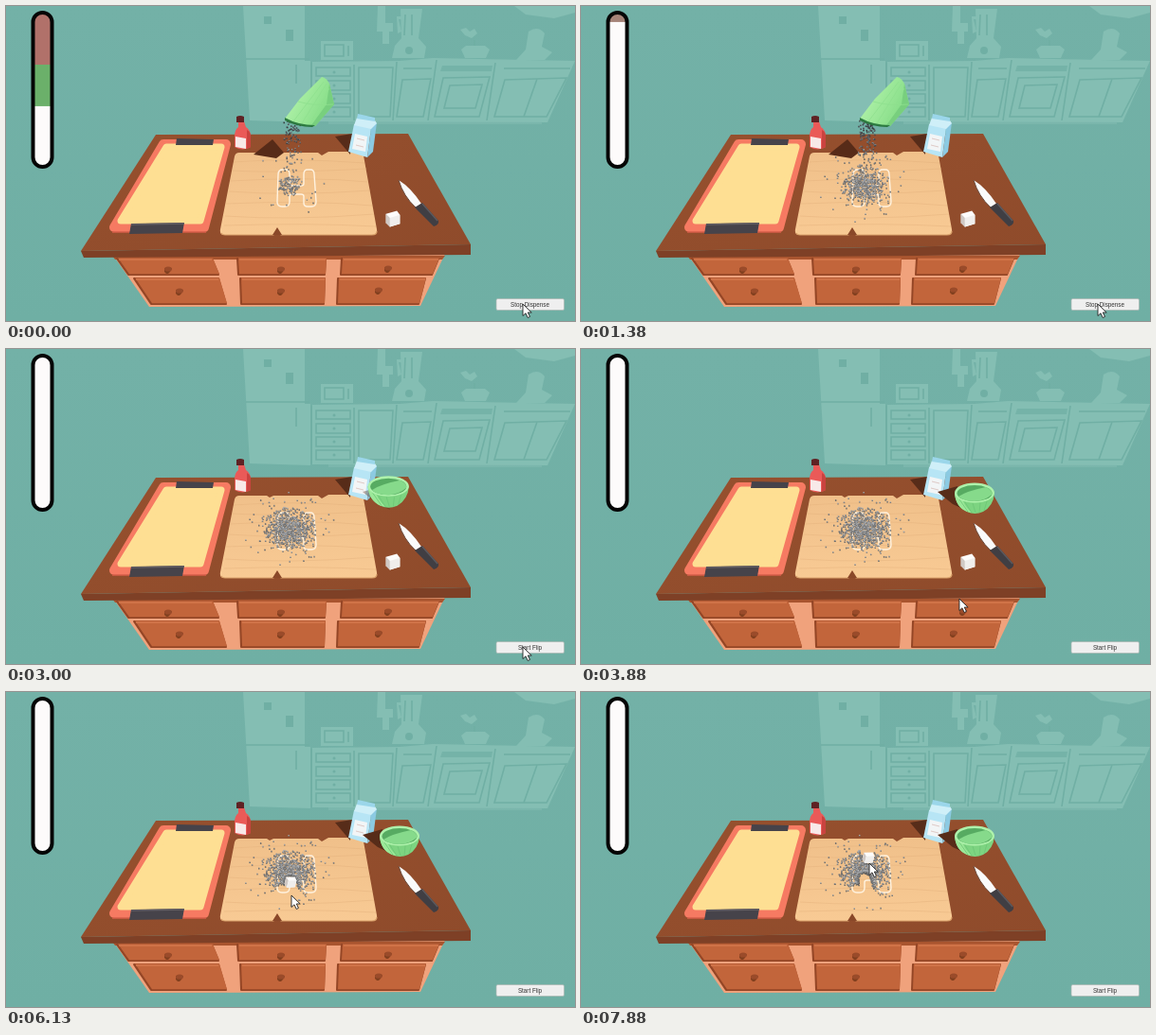
An HTML page with a canvas for the animation above (8000 ms loop, 600 px wide and 333 px high).

```html
<!DOCTYPE html>
<html lang="en">
<head>
<meta charset="utf-8">
<title>Kitchen powder game</title>
<style>
html, body { margin: 0; width: 100%; height: 100%; overflow: hidden; background: #70afa5; }
#stage { position: relative; width: 600px; height: 333px; overflow: hidden; }
svg, canvas { position: absolute; left: 0; top: 0; width: 600px; height: 333px; }
text { font: 6.3px "Liberation Sans", Arial, sans-serif; fill: #333; text-anchor: middle; }
</style>
</head>
<body>
<div id="stage">
<svg viewBox="0 0 600 333">
  <defs>
    <linearGradient id="wall" x2="0" y2="1">
      <stop offset="0" stop-color="#73b1a7"/><stop offset="1" stop-color="#6fafa4"/>
    </linearGradient>
    <linearGradient id="top" x2="1" y2="1">
      <stop offset="0" stop-color="#96502e"/><stop offset="1" stop-color="#8f4b2b"/>
    </linearGradient>
    <linearGradient id="wood" x2="0" y2="1">
      <stop offset="0" stop-color="#f0c08a"/><stop offset="1" stop-color="#f8ca94"/>
    </linearGradient>
    <linearGradient id="shell" x2="1" y2=".5">
      <stop offset=".2" stop-color="#b2f3aa"/><stop offset="1" stop-color="#84dc86"/>
    </linearGradient>
  </defs>
  <rect width="600" height="333" fill="url(#wall)"/>

  <!-- pale kitchen on the wall -->
  <g fill="#84beb3">
    <path d="M250 0H315V58H321V123L257 121Z"/>
    <path d="M323 59L415 58 450 55 600 58 571 123 323 122Z"/>
    <path d="M332 37H366V57H332Z"/>
    <path d="M392 0H400V18H408V27H404V40H397V27H391Z"/>
    <path d="M416 3H439L435 34 443 43 441 55H407L410 42 417 34Z"/>
    <path d="M412 11H418V14H414L417 27 413 29Z"/>
    <path d="M480 46L485 42H505L510 46 506 55H484Z"/>
    <path d="M479 25l6-2 4 4 5-3 3 5-6 5-7-3z"/>
    <path d="M536 0H600V7L578 13 548 9Z"/>
    <path d="M551 27Q561 20 568 29L565 43 576 49 568 57H538L548 46Z"/>
    <path d="M340 122H565V125H340Z" opacity=".5"/>
  </g>
  <g fill="none" stroke="#70afa4" stroke-width="1.6">
    <path d="M253 56H320M306 62V82M322 60V121M367 62V121M412 59L408 121M454 57L445 121M516 60L507 121"/>
    <path d="M327 65h36v9h-36zM327 79h36v10h-36zM327 93h36v10h-36zM327 107h36v10h-36z"/>
    <path d="M372 65H408L405 117H372ZM418 78L448 77 440 117H412Z"/>
    <path d="M461 76L510 75 499 117H452ZM468 84L502 83 495 108H462Z"/>
    <path d="M526 78L591 76 570 117H515ZM560 77L546 117M419 66H449M525 66H595"/>
    <path d="M336 41h20v12h-20zM361 42v11M494 36v6M421 9l-1 22M428 9v22"/>
  </g>
  <g fill="#70afa4">
    <path d="M272 11h8v8h-8zM295 25h8v12h-8z"/>
    <path d="M460 63H513L512 69H458Z" opacity=".7"/>
    <circle cx="425" cy="47" r="4"/><circle cx="346" cy="70" r="1.5"/>
    <circle cx="346" cy="84" r="1.5"/><circle cx="346" cy="98" r="1.5"/><circle cx="346" cy="112" r="1.5"/>
  </g>

  <!-- counter -->
  <path d="M112 262H463L437 317 151 318Z" fill="#f0a27c"/>
  <path d="M112 264H463L460 268H115Z" fill="#a9552f"/>
  <g id="drawers"></g>
  <path d="M158 136L424 135 490 252 79 259Z" fill="url(#top)"/>
  <path d="M79 259L490 252V263L82 266Z" fill="#7e4026"/>

  <!-- tray -->
  <path d="M166 146L232 146 209 234 114 234Z" fill="#f67a62" stroke="#f67a62" stroke-width="10" stroke-linejoin="round"/>
  <path d="M112 239H211" stroke="#d55c49" stroke-width="1.6"/>
  <path d="M169 149L227 149 205 227 121 227Z" fill="#fedf93" stroke="#fedf93" stroke-width="7" stroke-linejoin="round"/>
  <path d="M180 140L219 141 218 147 179 147Z" fill="#46434a"/>
  <path d="M132 230L188 229 186 240 130 241Z" fill="#46434a"/>
  <path d="M132 231L188 230" stroke="#625e64" stroke-width="1.5"/>

  <!-- board -->
  <path d="M246 155H275L278 157 282 155H329L333 158 340 154H372Q376 154 377 158L391 236Q392 242 386 242H290L286 235 282 242H230Q225 242 226 236L241 159Q242 155 246 155Z" fill="url(#wood)"/>
  <path d="M227 240Q228 242 231 242H282L284 239M289 240L290 242H386Q391 242 391 238" fill="none" stroke="#dba36c" stroke-width="1.2"/>
  <path d="M281 242L286 234 291 242Z" fill="#8a4829"/>
  <path d="M240 165Q300 160 378 166M238 174Q290 177 380 172M236 185Q320 180 382 186M235 196Q300 201 384 195M232 209Q320 205 386 211M231 222Q300 227 388 220M230 232Q320 229 390 233" fill="none" stroke="#e3b27c" stroke-width=".8" opacity=".6"/>
  <path d="M292 173H295Q299 173 299 178V188Q299 190 302 190H311Q314 190 314 188V178Q314 173 318 173H321Q325 173 325 178L327 207Q327 212 322 212H318Q314 212 314 208V201Q314 199 311 199H302Q299 199 299 201V207Q299 212 294 212H291Q286 212 286 207L287 178Q287 173 292 173Z" fill="none" stroke="#fff2df" stroke-width="1.4"/>

  <!-- bottle -->
  <path d="M245 122H251L253 128Q258 131 258 138V149Q250 154 241 149V138Q241 131 245 128Z" fill="#ea5a58"/>
  <path d="M243 117Q247 115 251 117V123H243Z" fill="#5f2224"/>
  <path d="M242 138L253 140V151L242 149Z" fill="#f8e9e8"/>
  <path d="M254 131Q258 133 258 138V149L254 151Z" fill="#c9433f"/>

  <!-- carton -->
  <path d="M347 138L365 135 363 157Z" fill="#572c19"/>
  <path d="M367 125L385 129 381 160 361 154Z" fill="#b7e5f5"/>
  <path d="M385 129L391 123 387 154 381 160Z" fill="#8ccae2"/>
  <path d="M370 118L389 121 391 124 385 130 367 126Z" fill="#cfeff8"/>
  <path d="M371 114L389 118V122L370 119Z" fill="#9bd6ea"/>
  <path d="M368 135L381 138 379 154 365 151Z" fill="#f2f5f6"/>
  <path d="M370 140L378 142M369 147L377 149" stroke="#dcc4c0" stroke-width=".9"/>

  <!-- knife -->
  <path d="M414 184Q427 192 438 209L432 213Q419 201 414 184Z" fill="#fafafa"/>
  <path d="M414 184Q419 201 432 213" fill="none" stroke="#6a4a3c" stroke-width="1"/>
  <path d="M431 213L439 208 456 227Q457 231 451 233Z" fill="#403e43"/>
  <path d="M439 209L455 227" stroke="#5d5b60" stroke-width="1.3"/>
  <path id="pourShade" d="M281 141L293 155 285 161 261 157Z" fill="#572b18"/>
</svg>

<canvas id="dots" width="1200" height="666"></canvas>

<svg viewBox="0 0 600 333">
  <path id="restShade" d="M376 151L397 145 405 170 392 164Z" fill="#572c19"/>
  <g id="pour">
    <path d="M333 75Q338 76 341 82L346 104 326 127Q307 127 294 119L310 98Z" fill="url(#shell)"/>
    <path d="M341 82L346 104 326 127 322 126 338 104Z" fill="#78cf7e"/>
    <path d="M335 80L303 122M338 82L312 124M341 87L320 126M308 101Q325 106 345 104" fill="none" stroke="#8fe08e" stroke-width=".8"/>
    <path d="M294 118Q308 126 326 126L323 128Q307 128 294 121Z" fill="#2c7a40"/>
  </g>
  <g id="bowl">
    <path d="M-21 -5Q-20 10 -8 15Q0 19 9 15Q20 9 21 -5Z" fill="#7dd481"/>
    <path d="M-21 -5Q-20 10 -8 15L-3 16Q-12 8 -13 0Z" fill="#9ce899"/>
    <path d="M-16 2L-7 15M-10 5L-3 16M-2 6L1 16M6 6L5 16M13 4L10 14" stroke="#6cc676" stroke-width=".8"/>
    <ellipse cy="-5" rx="21" ry="10.5" fill="#aef2ab"/>
    <ellipse cy="-4.5" rx="18.5" ry="8.5" fill="#57ab62"/>
    <path d="M-17 -1Q-8 -7 12 -11Q20 -7 18 -3Q10 4 0 4Q-11 4 -17 -1Z" fill="#86da8b"/>
  </g>
  <g id="cube">
    <path d="M-7 -5L4 -8 7 -4 7 5 -3 8 -7 4Z" fill="#fdfcfb"/>
    <path d="M-7 -5L-3 -1V8L-7 4Z" fill="#cfc8c4"/>
    <path d="M-3 -1L7 -4V5L-3 8Z" fill="#f0eeec"/>
  </g>

  <clipPath id="tube"><rect x="29.5" y="8" width="17.5" height="161" rx="8.7"/></clipPath>
  <g clip-path="url(#tube)">
    <rect x="29" y="7" width="19" height="55" fill="#b1716a"/>
    <rect x="29" y="62" width="19" height="48" fill="#6bb06a"/>
    <rect id="cap" x="29" y="7" width="19" height="12" fill="#a58378"/>
    <rect id="fill" x="29" y="106" width="19" height="170" fill="#fdfbfb"/>
  </g>
  <rect x="28.5" y="7" width="20" height="163" rx="10" fill="none" stroke="#050505" stroke-width="4"/>

  <rect x="517" y="309.5" width="71.5" height="12" rx="1.5" fill="#efefef" stroke="#a9b6b2" stroke-width=".7"/>
  <text id="label" x="552.5" y="318">Stop Dispense</text>
  <circle id="click" r="3" fill="#df4a35"/>
  <path id="cursor" d="M0 0V12.5L3 9.8 5.2 14.5 7.5 13.4 5.3 9H9.2Z" fill="#fff" stroke="#222" stroke-width=".9"/>
</svg>
</div>

<script>
const LOOP = 8000, COUNT = 900, FALL = 430, LIP = 120;
const $ = id => document.getElementById(id);
const ctx = $("dots").getContext("2d");
const clamp = (v, a = 0, b = 1) => Math.min(b, Math.max(a, v));
const mix = (a, b, p) => a + (b - a) * p;
const between = (t, a, b) => t >= a && t < b;

let seed = 71;
const rand = () => (seed = (seed * 16807) % 2147483647) / 2147483647;

// Keys are [time, x, y]; gentle segments ease in and out.
function along(keys, t, gentle) {
  let i = 1;
  while (i < keys.length - 1 && t > keys[i][0]) i++;
  const [a, b] = [keys[i - 1], keys[i]];
  let p = clamp((t - a[0]) / (b[0] - a[0]));
  if (gentle) p = p * p * (3 - 2 * p);
  return [mix(a[1], b[1], p), mix(a[2], b[2], p)];
}

const cubePath = [[4950, 408, 225], [5300, 294, 222], [5680, 291, 210], [5880, 303, 214],
  [6130, 300, 201], [6350, 299, 198], [6550, 300, 220], [6800, 346, 225],
  [7100, 350, 156], [7350, 303, 152], [7880, 303, 175], [8000, 303, 177]];
const cursorPath = [[3250, 545, 315], [4400, 290, 226], [5000, 290, 226], [5300, 295, 236]];

const grains = Array.from({ length: COUNT }, () => {
  const born = mix(-800, 1720, rand());
  const grow = mix(0.35, 1, clamp((born + 800) / 1700));
  const far = rand() < 0.08;
  const r = far ? mix(0.9, 1.75, rand() ** 1.5) : Math.sqrt(rand()) * grow;
  const angle = rand() * Math.PI * 2;
  return {
    born, x: 299 + Math.cos(angle) * r * 28, y: 190 + Math.sin(angle) * r * 22.5,
    from: mix(293, 311, rand()), tone: rand()
  };
}).sort((a, b) => a.y - b.y);

// Dark at the bowl's lip, paler towards the board.
function drawGrain(x, y, tone, fallen) {
  const g = Math.round(mix(mix(35, 90, tone), mix(110, 185, tone), fallen));
  ctx.fillStyle = fallen < 0.6 ? "#34373a" : "#5a5753";
  ctx.fillRect(x - 0.7, y - 0.2, 1.5, 1.1);
  ctx.fillStyle = `rgb(${g},${g + 3},${g + 7})`;
  ctx.fillRect(x - 0.7, y - 0.8, 1.3, 1.2);
}

// Grains touched by the cube slide out to its rim.
function pushed(grain, trail) {
  let { x, y } = grain;
  for (const [cx, cy] of trail) {
    const dx = x - cx, dy = y - cy, d = Math.hypot(dx, dy) || 1;
    const reach = 6 + grain.tone * 3.5;
    if (d < reach) {
      x = cx + dx / d * reach;
      y = cy + dy / d * reach;
    }
  }
  return [x, y];
}

function drawGrains(t) {
  ctx.setTransform(2, 0, 0, 2, 0, 0);
  ctx.clearRect(0, 0, 600, 333);
  const start = cubePath[1][0], trail = [];
  for (let s = start; s <= t; s += 25) trail.push(along(cubePath, s));
  if (t > start) trail.push(along(cubePath, t));
  for (const g of grains) {
    const p = (t - g.born) / FALL;
    if (p < 0) continue;
    if (p < 1) drawGrain(mix(g.from, g.x, p ** 3), mix(LIP, g.y, p ** 1.6), g.tone, p);
    else drawGrain(...pushed(g, trail), g.tone, 1);
  }
}

function drawBowl(t) {
  const p = clamp((t - 2300) / 800), x = mix(320, 415, p), y = mix(102, 157, p);
  const tipped = p < 0.5;
  $("pour").style.display = $("pourShade").style.display = tipped ? "" : "none";
  $("bowl").style.display = tipped ? "none" : "";
  $("pour").setAttribute("transform", `translate(${x - 320} ${y - 102}) rotate(${p * 130} 320 102)`);
  const tilt = Math.min(0, mix(-130, 22, p));
  $("bowl").setAttribute("transform", `translate(${x} ${y}) rotate(${tilt}) scale(${mix(1.25, 1, p)})`);
  $("pourShade").setAttribute("transform", `translate(${p * 80} 0)`);
  $("restShade").style.opacity = clamp((p - 0.8) * 5);
}

function drawPointer(t) {
  const [cx, cy] = along(cubePath, t);
  const held = clamp((t - cubePath[0][0]) / 300);
  $("cube").setAttribute("transform", `translate(${cx} ${cy}) rotate(${held * 14}) scale(${mix(1.05, 0.82, held)})`);
  const [x, y] = t < cubePath[1][0] ? along(cursorPath, t, true)
    : [cx + 1, cy + mix(14, 6, clamp((t - 6130) / 1750))];
  $("cursor").setAttribute("transform", `translate(${x} ${y})`);
  $("click").setAttribute("transform", `translate(${x} ${y + 1})`);
  $("click").style.opacity = between(t, 2060, 2250) || between(t, 4800, 5000) ? 1 : 0;
}

function buildDrawers() {
  // Each row: left and right ends along the top, then along the bottom.
  const rows = [
    [[117, 217, 129, 224], [244, 337, 245, 336], [354, 456, 353, 449], 267, 284],
    [[135, 224, 153, 232], [247, 336, 248, 335], [350, 442, 349, 435], 288, 315]
  ];
  const knobs = [[171, 279], [290, 279], [403, 278], [183, 302], [290, 302], [393, 301]];
  let out = "";
  for (const row of rows) {
    const [top, bottom] = row.slice(3);
    for (const [a, b, c, d] of row.slice(0, 3)) {
      const shape = `M${a} ${top}H${b}L${d} ${bottom}H${c}Z`;
      out += `<path d="${shape}" fill="#944626" stroke="#944626" stroke-width="2" stroke-linejoin="round"/>`
        + `<path d="${shape}" fill="#c2653b" transform="translate(1 -.8)"/>`
        + `<path d="M${a + 2} ${top + 1}H${b}" stroke="#d5794d" stroke-width="1.3"/>`;
    }
  }
  for (const [x, y] of knobs)
    out += `<path d="M${x - 4} ${y - 2}h8l-2 4-2 2h-2l-2-2z" fill="#82401f"/><ellipse cx="${x}" cy="${y - 1}" rx="4" ry="2.6" fill="#9a4b2a"/>`;
  $("drawers").innerHTML = out;
}

function frame() {
  const t = performance.now() % LOOP;
  const level = Math.max(6, 106 - t * 0.0645);
  $("fill").setAttribute("y", level);
  $("cap").style.opacity = clamp((60 - level) / 40);
  $("label").textContent = t < 2300 ? "Stop Dispense" : "Start Flip";
  drawGrains(t);
  drawBowl(t);
  drawPointer(t);
  requestAnimationFrame(frame);
}

buildDrawers();
frame();
</script>
</body>
</html>
```
